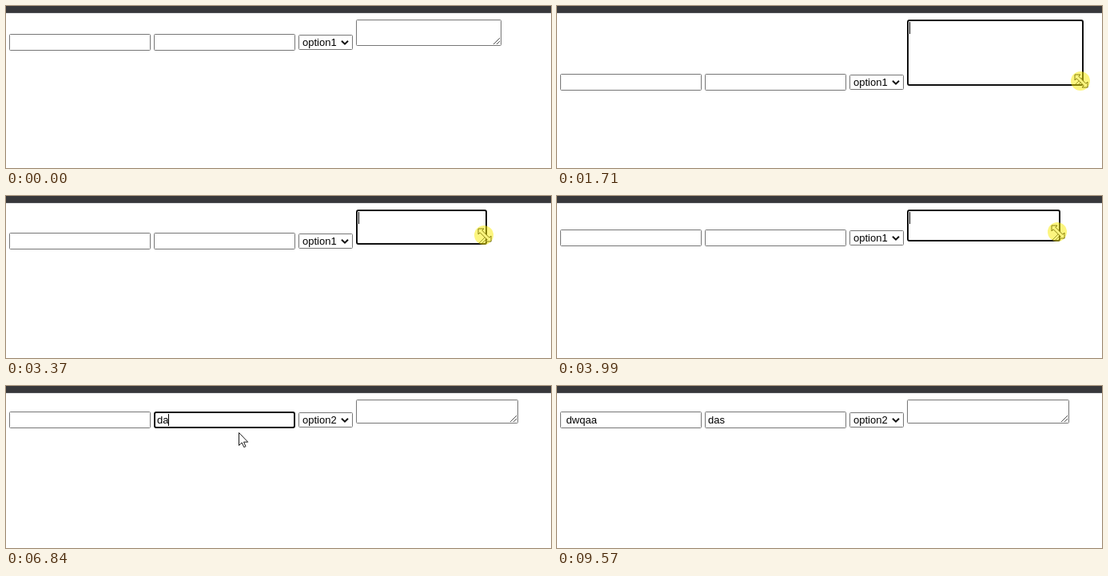
An HTML page that plays this animation: 682 px wide and 203 px high, repeating every 9630 ms.

```html
<!DOCTYPE html>
<html lang="en">
<head>
<meta charset="utf-8">
<title>Form controls</title>
<style>
  html, body { margin: 0; width: 682px; height: 203px; overflow: hidden; background: #fff; }
  svg { display: block; }
  text { font: 13px "Liberation Sans", Arial, sans-serif; white-space: pre; fill: #000; }
  .field { fill: #fff; stroke: #767676; stroke-width: 1; }
  .field.focus { stroke: #101010; stroke-width: 2; }
  #select.focus { stroke-width: 1; }
  .cursor path { fill: #fff; stroke: #1a1a1a; }
  #menu { filter: drop-shadow(0 2px 4px rgba(0, 0, 0, .45)); }
</style>
</head>
<body>
<svg width="682" height="203" viewBox="0 0 682 203">
  <rect width="682" height="9" fill="#55565a"/>
  <rect width="682" height="8" fill="#37373a"/>

  <rect id="area" class="field"/>
  <path id="grip" d="M-10 -2l8 -8M-6 -2l4 -4" fill="none" stroke="#505050"/>

  <!-- y = 0 is the shared text baseline -->
  <g id="row">
    <rect id="first" class="field"/>
    <rect id="second" class="field"/>
    <text id="firstText" x="8"></text>
    <text id="secondText" x="189"></text>
    <rect id="select" class="field"/>
    <text id="choice" x="371"></text>
    <path d="M420 -6.3l4 4 4 -4" fill="none" stroke="#111" stroke-width="2"/>
    <g id="menu">
      <rect x="366.5" y="5.5" width="67" height="51" fill="#fff" stroke="#666"/>
      <rect id="hover" x="367" width="66" height="16" fill="#5b82f5"/>
      <text class="option" x="371" y="18">option1</text>
      <text class="option" x="371" y="35">option2</text>
      <text class="option" x="371" y="51">option3</text>
    </g>
  </g>

  <rect id="caret" width="1" height="15"/>

  <g id="pointer">
    <g class="cursor" id="arrow"><path d="M.5 .5V16.5L4.2 13L6.8 18.7L9 17.7L6.5 12.2H11.7Z"/></g>
    <g class="cursor" id="resize"><path d="M-7 -8H0L-2.2 -5.8L6.8 3.2L9 1V8H2L4.2 5.8L-4.8 -3.2L-7 -1Z"/></g>
    <g class="cursor" id="beam"><path d="M-3 -8.5H-.5L0 -8L.5 -8.5H3M0 -8V8M-3 8.5H-.5L0 8L.5 8.5H3" style="fill:none"/></g>
    <circle id="press" r="12" fill="#faeb00" fill-opacity=".5"/>
  </g>
</svg>
<script>
const LOOP = 9630, BLUR = 9570, BLINK = 460, TAP = 140;
const $ = id => document.getElementById(id);

// The dragged corner of the text area: pulled wide, pushed in, bounced, settled.
const corner = { from: [620, 50], legs: [
  { at: 1220, for: 490, to: [659, 100] },
  { at: 1710, for: 280, to: [672, 131] },
  { at: 2380, for: 400, to: [598, 53] },
  { at: 3300, for: 320, to: [628, 117] },
  { at: 3620, for: 370, to: [630, 57] },
  { at: 3990, for: 410, to: [641, 47] }
] };

// Pointer moves; a click happens on arrival and sets the focus.
const hand = { from: [676, 198], legs: [
  { at: 70, for: 750, to: [616, 44], click: "area", hold: 3650 },
  { at: 4400, for: 1, to: [637, 35] },
  { at: 4480, for: 440, to: [410, 44], click: "select" },
  { at: 5220, for: 350, to: [414, 80], click: "option" },
  { at: 5780, for: 330, to: [290, 45], click: "second", hold: 200 },
  { at: 6310, for: 150, to: [291, 58] },
  { at: 6900, for: 500, to: [70, 37], click: "first" },
  { at: 7870, for: 480, to: [566, 178] }
] };

const typing = {
  first: { text: " dwqaa", start: 7600, gap: 138 },
  second: { text: "das", start: 6590, gap: 230 }
};

const clamp = (v, lo, hi) => Math.max(lo, Math.min(hi, v));
const ease = u => (u = clamp(u, 0, 1), u * u * (3 - 2 * u));
const end = leg => leg.at + leg.for;
const show = (id, on) => $(id).setAttribute("visibility", on ? "visible" : "hidden");
const move = (id, x, y) => $(id).setAttribute("transform", `translate(${x} ${y})`);
const set = (el, attrs) => { for (const k in attrs) el.setAttribute(k, attrs[k]); };

function follow({ from, legs }, t) {
  let pos = from;
  for (const leg of legs) {
    const u = ease((t - leg.at) / leg.for);
    pos = pos.map((p, i) => p + (leg.to[i] - p) * u);
  }
  return pos.map(Math.round);
}

function box(id, x, y, w, h, focused) {
  const el = $(id);
  el.classList.toggle("focus", focused);
  const inset = focused && id !== "select" ? 1 : .5;
  set(el, { x: x + inset, y: y + inset, width: w - 2 * inset, height: h - 2 * inset, rx: 2 * inset });
}

function typed({ text, start, gap }, t) {
  return text.slice(0, clamp(Math.floor((t - start) / gap) + 1, 0, text.length));
}

function drawCaret(focus, t, bottom) {
  const field = typing[focus];
  if (!field) {
    show("caret", focus === "area");
    set($("caret"), { x: 441, y: 20 });
    return;
  }
  const idle = Math.max(0, t - field.start - field.gap * (field.text.length - 1));
  show("caret", Math.floor(idle / BLINK) % 2 === 0);
  const label = $(focus + "Text");
  const width = label.textContent ? label.getComputedTextLength() : 0;
  set($("caret"), { x: Math.floor(+label.getAttribute("x") + width), y: bottom - 12 });
}

function drawPointer(t, [x, y], right, bottom, dragging, pressed) {
  const inside = (l, top, r, b) => x >= l && x < r && y >= top && y < b;
  const overField = inside(438, 17, right, bottom)
    || [4, 185].some(l => inside(l, bottom - 15, l + 177, bottom + 6));
  const overGrip = inside(right - 16, bottom - 16, right, bottom);
  const kind = dragging || overGrip ? "resize" : overField ? "beam" : "arrow";
  const visible = t >= hand.legs[0].at && t < end(hand.legs[hand.legs.length - 1]);
  for (const id of ["arrow", "resize", "beam"]) show(id, visible && id === kind);
  show("press", pressed);
  move("pointer", x, y);
}

function draw(t) {
  const [right, bottom] = follow(corner, t);
  const last = hand.legs.filter(leg => leg.click && end(leg) <= t).pop();
  const focus = last && t < BLUR ? last.click : "";
  const pressed = !!last && t < end(last) + (last.hold || TAP);
  const dragging = pressed && focus === "area";

  // Pushing inwards leaves the corner trailing a little behind the pointer.
  const lag = 6 + Math.round(6 * ease((t - 2380) / 280));
  const [x, y] = dragging ? [right - 4, bottom - lag] : follow(hand, t);

  const open = focus === "select" || (focus === "option" && pressed);
  const chosen = t >= end(hand.legs.find(leg => leg.click === "option")) + TAP;
  const hovered = clamp(Math.floor((y - bottom - 6) / 16.5), 0, 2);

  box("area", 438, 17, right - 438, bottom - 17, focus === "area");
  move("grip", right, bottom);
  move("row", 0, bottom);
  box("first", 4, -15, 177, 21, focus === "first");
  box("second", 185, -15, 177, 21, focus === "second");
  box("select", 366, -14, 68, 19, focus === "select" || focus === "option");
  for (const id in typing) $(id + "Text").textContent = typed(typing[id], t);
  $("choice").textContent = chosen ? "option2" : "option1";

  show("menu", open);
  set($("hover"), { y: 6 + Math.round(hovered * 16.6) });
  document.querySelectorAll(".option").forEach((o, i) => {
    o.style.fill = i === hovered ? "#fff" : "#000";
  });

  drawCaret(focus, t, bottom);
  drawPointer(t, [x, y], right, bottom, dragging, pressed);
}

const begin = performance.now();
function frame() {
  draw((performance.now() - begin) % LOOP);
  requestAnimationFrame(frame);
}
frame();
</script>
</body>
</html>
```
